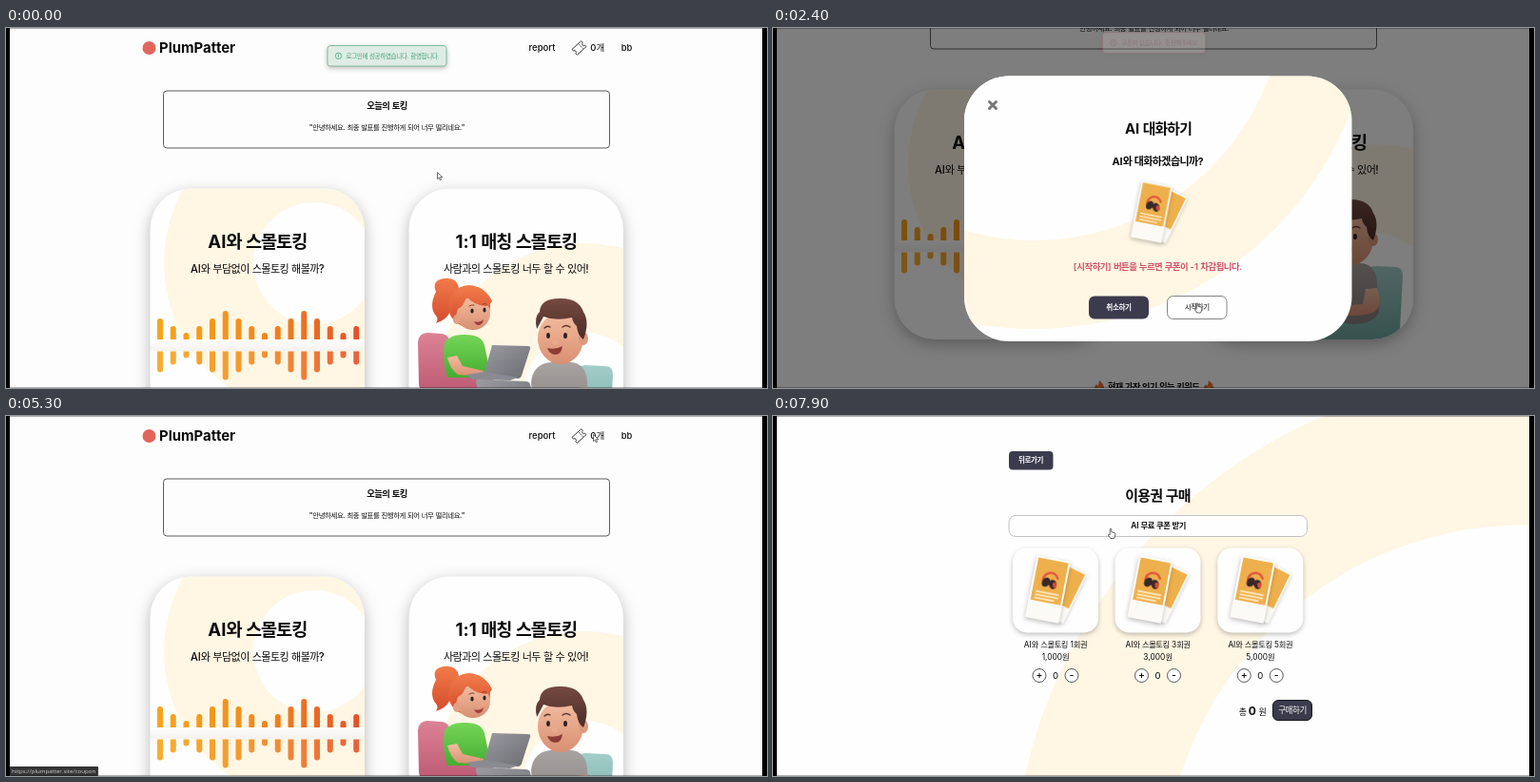
Recreate the animation shown at these times as an HTML page. Size 800 by 378 pixels, loop 8000 ms.

```html
<!DOCTYPE html>
<html lang="ko">
<head>
<meta charset="utf-8">
<style>
html, body { margin: 0; width: 100%; height: 100%; overflow: hidden; background: #000; }
svg { display: block; width: 800px; height: 378px; }
text { font-family: Inter, "Noto Sans CJK KR", sans-serif; white-space: pre; }
.ko { letter-spacing: -.055em; }
.url { font-family: "Open Sans", sans-serif; }
.card { filter: drop-shadow(0 5px 8px rgba(0,0,0,.28)); }
.soft { filter: drop-shadow(0 2px 2.5px rgba(0,0,0,.25)); }
</style>
</head>
<body>
<svg id="stage" viewBox="0 0 800 378"></svg>
<script>
const LOOP = 8000, INK = '#0b0b0b', CREAM = '#fff6e3', NAVY = '#3c3b4d';

// Text is placed by the centre of its line; only Hangul runs are tightened.
const text = (x, y, size, str, weight = 400, fill = INK, anchor = 'middle', cls = '') =>
  `<text x="${x}" y="${y + size * .36}" font-size="${size}" font-weight="${weight}" fill="${fill}" text-anchor="${anchor}" class="${cls}">${str.replace(/[가-힣]+/g, '<tspan class="ko">$&</tspan>')}</text>`;
const rect = (x, y, w, h, r, fill, more = '') =>
  `<rect x="${x}" y="${y}" width="${w}" height="${h}" rx="${r}" fill="${fill}" ${more}/>`;
const circle = (x, y, r, fill, more = '') => `<circle cx="${x}" cy="${y}" r="${r}" fill="${fill}" ${more}/>`;
const oval = (x, y, rx, ry, fill, turn = 0) =>
  `<ellipse cx="${x}" cy="${y}" rx="${rx}" ry="${ry}" fill="${fill}" transform="rotate(${turn} ${x} ${y})"/>`;
const path = (d, fill, more = '') => `<path d="${d}" fill="${fill}" ${more}/>`;
const line = (d, color, w) => path(d, 'none', `stroke="${color}" stroke-width="${w}" stroke-linecap="round" stroke-linejoin="round"`);
const ring = (x, y, outer, inner) => circle(x, y, outer, CREAM) + circle(x, y, inner, '#fefefe');
const group = (id, body, more = '') => `<g id="${id}" ${more}>${body}</g>`;
const shade = (id, a, b, dir = 'x2="0" y2="1"') =>
  `<linearGradient id="${id}" x1="0" y1="0" ${dir}><stop stop-color="${a}"/><stop offset="1" stop-color="${b}"/></linearGradient>`;
const clip = (id, ...box) => `<clipPath id="${id}">${rect(...box, '#000')}</clipPath>`;

const defs = `<defs>
  ${clip('clipA', 151.5, 64.5, 225.5, 262.5, 43)}${clip('clipB', 423.5, 64.5, 225.5, 262.5, 43)}
  ${clip('clipM', 201, 50.5, 407.5, 278.5, 47)}
  <linearGradient id="wave" gradientUnits="userSpaceOnUse" x1="159" x2="372" y1="0" y2="0"><stop stop-color="#f7a51b"/><stop offset=".5" stop-color="#f18a1d"/><stop offset="1" stop-color="#e5502b"/></linearGradient>
  ${shade('band', '#fff', '#f3f1f0')}
  ${shade('pink', '#dc8296', '#bd5b74')}${shade('teal', '#a3cdc8', '#6fa5a1')}
  ${shade('green', '#74d657', '#45ad32')}${shade('tee', '#a8a3a1', '#837e7d')}
  ${shade('skin', '#f3bda0', '#d98f72')}${shade('red', '#f27b4a', '#d34c2c')}
  ${shade('brown', '#754a40', '#4b2b28')}${shade('metal', '#9b9ba1', '#6b6b72', 'x2="1" y2="1"')}
</defs>`;

function bars() {
  const heights = [22, 14, 7, 14, 22, 30];
  let out = rect(152, 222.5, 225, 12.5, 0, 'url(#band)', 'opacity=".9"');
  for (let i = 0; i < 16; i++) {
    const h = heights[i % 6], x = 159 + i * 13.75;
    out += path(`M${x} 223v${3 - h}a3 3 0 0 1 6 0v${h - 3}z`, 'url(#wave)')
      + path(`M${x} 235.5v${h - 3}a3 3 0 0 0 6 0v${3 - h}z`, 'url(#wave)', 'opacity=".9"');
  }
  return out;
}

function girl() {
  return path('M433 226q1-10 10-10l15 1q8 1 9 10l3 34 38 2q5 1 5 7t-6 6l-66 1q-7 0-7-8z', 'url(#pink)')
    + path('M452 173q-5-12 8-14 14-2 16 10-4 9-8 14 2 17-16 23 3-5 0-8-8-9 0-25z', 'url(#red)')
    + path('M461 226q7-9 22-8 17 0 20 11l5 24q-8 10-22 10h-22q-6-18-3-37z', 'url(#green)')
    + path('M464 242l10-2 6 11 22 5-2 6-25-2q-8-6-11-18z', 'url(#skin)')
    + circle(487, 188, 22, 'url(#red)') + oval(491, 196, 18, 17, 'url(#skin)')
    + path('M471 205q-8-24 8-35 22-8 32 13-3 5-7 5-12-1-20-10-3 11-9 13z', 'url(#red)')
    + oval(474, 202, 4, 5, '#e3a083')
    + oval(490, 193, 1.7, 2.6, '#352522') + oval(503, 192, 1.6, 2.5, '#352522')
    + line('M487 188q3-2 5-1M501 186q3-1 4 0', '#8e3f2a', 1)
    + path('M492 204q6 2 10-2-1 6-6 6-3-1-4-4z', '#9c4038') + oval(500, 198, 2.4, 2, '#eaa383')
    + path('M511 229l38 1q3 0 2 3l-9 28q-1 3-4 3l-36-3z', 'url(#metal)')
    + path('M484 260l20-3 34 6-8 3-40-1z', '#8a8b92');
}

function boy() {
  return path('M594 264q3-13 15-14l21 1q8 0 8 9l-3 57q0 10-12 10h-120q-11-2-11-10t13-8l75-2z', 'url(#teal)')
    + path('M552 268q2-19 20-21h22q15 1 17 19l2 33q-6 12-29 12l-29-7z', 'url(#tee)')
    + path('M599 274l12-1q6 19-3 25-10 6-44 3l-7-4 2-5 37-2z', 'url(#skin)')
    + oval(583, 222, 24, 27, 'url(#skin)') + oval(607, 222, 5, 7, '#dd987c')
    + path('M558 212q-3-13 3-18 1-15 23-14 18 0 23 14 7 11 0 29-6-4-7-14-4-3-5-9-17 4-30-1-3 6-7 13z', 'url(#brown)')
    + oval(570, 219, 1.9, 3, '#302220') + oval(588, 219, 2, 3.1, '#302220')
    + line('M566 211q3-3 6-1M585 210q4-3 8 0', '#553229', 1.4)
    + path('M569 232q9 2 16-2-1 9-8 9-6-1-8-7z', '#8d3c36') + oval(577, 226, 3, 2.5, '#ebaa8c')
    + path('M496 265l50 2q4 0 5 3l9 34q0 4-4 4l-50 1q-3 0-4-3l-8-38q0-3 2-3z', 'url(#metal)')
    + path('M504 309l54-4 16-2 2 2-22 5-45 2z', '#8e8f95');
}

function tickets(x, y, scale = 1) {
  const paper = print => `<g class="soft">${rect(-18, -33, 36, 66, 1.5, '#fcfaf5')}${rect(-16, -31, 32, 45, .5, '#eeb04c')}${print}</g>`;
  const print = line('M-7-9A8 9 0 0 1 8-13', '#e0533c', 2.4)
    + oval(-3.5, -7, 4, 5.2, '#38282a', 25) + oval(4, -6, 4, 5, '#38282a', -25) + oval(6, -5.5, 2, 3, '#d94b39', -20)
    + line('M-12 4h24M-12 7.5h24M-12 11h20', '#fff2d4', 1.3);
  return `<g transform="translate(${x} ${y}) scale(${scale})">
    <g transform="translate(14.5 3) rotate(26) scale(.88)">${paper('')}</g>
    <g transform="rotate(11)">${paper(print)}</g></g>`;
}

const flame = x => path(`M${x} 370q5 4 5 8 0 4-5 4t-5-4q0-2 2-4l1 2q2-2 2-6z`, '#ee6a2a') + oval(x, 379, 2, 2.5, '#fcc04a');

// Page coordinates are those of the page scrolled by 104px.
function home() {
  const header = circle(150.5, -83, 7, '#e2655c')
    + text(161, -83, 14.9, 'PlumPatter', 700, INK, 'start')
    + text(563.5, -83, 9.5, 'report', 500)
    + `<g transform="translate(602.5 -83) rotate(-42)">${path('M-6.5-4h13v2.4a1.7 1.7 0 0 0 0 3.4v2.2h-13v-2.2a1.7 1.7 0 0 0 0-3.4z', 'none', 'stroke="#333" stroke-width=".9"')}${line('M2.5-3v1.2M2.5-.5v1M2.5 2v1', '#333', .7)}</g>`
    + text(621.5, -83, 9.5, '0개', 500) + text(652.5, -83, 9.3, 'bb', 500);
  const topic = rect(165.5, -38, 469, 60, 3.5, '#fdfdfd', 'stroke="#4a4a4a" stroke-width=".9"')
    + text(400.5, -22, 9.35, '오늘의 토킹', 700)
    + text(400.5, .5, 7.4, '"안녕하세요. 최종 발표를 진행하게 되어 너무 떨리네요."', 500);
  const card = (id, x, inside, title, note) => group(id,
    rect(x, 64.5, 225.5, 262.5, 43, '#fefefe', 'class="card"')
    + `<g clip-path="url(#clip${id})">${inside}</g>`
    + text(x + 112.8, 120, 18.6, title, 700) + text(x + 112.8, 149.5, 11.1, note, 500));
  return header + topic
    + card('A', 151.5, ring(324, 143, 158, 64) + bars(), 'AI와 스몰토킹', 'AI와 부담없이 스몰토킹 해볼까?')
    + card('B', 423.5, ring(608, 280, 158, 64) + girl() + boy(), '1:1 매칭 스몰토킹', '사람과의 스몰토킹 너두 할 수 있어!')
    + flame(343) + flame(458) + text(400, 376.5, 9.2, '현재 가장 인기 있는 키워드', 700);
}

function modal() {
  return rect(0, 0, 800, 378, 0, '#000', 'opacity=".5"')
    + rect(201, 50.5, 407.5, 278.5, 47, '#fefefe')
    + `<g clip-path="url(#clipM)">${ring(275, -40, 356, 263)}</g>`
    + line('M227.5 77.5l7 7m0-7l-7 7', '#777', 3)
    + text(405, 105.5, 14.8, 'AI 대화하기', 700) + text(404.5, 140, 11, 'AI와 대화하겠습니까?', 700)
    + tickets(398, 193, .92)
    + text(404.5, 251, 9.45, '[시작하기] 버튼을 누르면 쿠폰이 -1 차감됩니다.', 600, '#d0526b')
    + rect(332, 281.5, 63, 24, 6, NAVY) + text(363.5, 293.5, 7.6, '취소하기', 600, '#fff')
    + rect(414.5, 281.5, 62.5, 24, 6, '#fff', 'stroke="#777" stroke-width=".9"') + text(445.7, 293.5, 7.5, '시작하기', 500);
}

function shop() {
  const item = (x, n) => rect(x - 45, 138.5, 90, 89, 15, '#fefefe', 'class="soft"') + tickets(x - 8, 182)
    + text(x, 240.5, 8.3, `AI와 스몰토킹 ${n}회권`) + text(x, 252.5, 8.4, `${n},000원`)
    + [-17, 17].map(d => circle(x + d, 272.5, 7, '#fefefe', 'stroke="#444" stroke-width=".9"')
      + text(x + d, 272, 10.5, d < 0 ? '+' : '-', 500)).join('')
    + text(x, 272.5, 9.6, '0');
  return rect(0, 0, 800, 378, 0, '#fefefe') + ring(790, 495, 538, 380.5)
    + rect(248, 37, 46.5, 19.5, 4, NAVY) + text(271, 46.7, 7.5, '뒤로가기', 600, '#fff')
    + text(404.5, 83.5, 15, '이용권 구매', 700)
    + rect(248, 104.5, 313.5, 22, 7, '#fefefe', 'stroke="#bbb" stroke-width=".9"')
    + text(405, 115.5, 8.3, 'AI 무료 쿠폰 받기', 600)
    + item(297, 1) + item(404.5, 3) + item(512.3, 5)
    + text(493.7, 310.5, 9, '총') + text(503.8, 309.5, 12, '0', 700) + text(514.3, 310.5, 9, '원')
    + rect(525.5, 298.5, 41, 21, 5.5, NAVY, 'stroke="#15151c" stroke-width="1"') + text(546, 309, 8.6, '구매하기', 400, '#fff');
}

const toast = (id, x, w, fill, edge, ink, size, str) => group(id,
  rect(x, 18.5, w, 21.5, 3, fill, `stroke="${edge}" stroke-width=".9" class="soft"`)
  + circle(x + 11.5, 29.3, 3.2, 'none', `stroke="${ink}" stroke-width=".8"`) + line(`M${x + 11.5} 27.8v1.8m0 1.2v.1`, ink, .8)
  + text(x + 19.5, 29.3, size, str, 500, ink, 'start'));

document.getElementById('stage').innerHTML = defs
  + rect(0, 0, 800, 378, 0, '#fdfdfd') + group('home', home()) + group('modal', modal())
  + toast('hello', 338, 125, '#dfece6', '#78b898', '#45a175', 6.55, '로그인에 성공하였습니다. 환영합니다.')
  + toast('empty', 346.5, 108, '#fbe4e6', '#df5264', '#cf4756', 6.65, '쿠폰이 없습니다. 충전해주세요.')
  + group('shop', shop())
  + group('status', rect(4, 368, 85, 10, 1, '#353535') + text(6, 373.2, 6.1, '', 400, '#d2d2d2', 'start', 'url'))
  + group('arrow', path('M0 0v7.2l1.7-1.6 1.2 2.7 1.2-.5-1.2-2.7h2.4z', '#fff', 'stroke="#333" stroke-width=".7"'))
  + group('hand', path('M-.8 4.5V.6a.8.8 0 0 1 1.6 0v2.7l3 .7q1.2.3 1 1.6l-.5 2.7-.8 1.7h-3.6l-2.6-3.4q.2-1.6 1.9-.2z', '#fff', 'stroke="#333" stroke-width=".75"'))
  + rect(0, 0, 4, 378, 0, '#000') + rect(795, 0, 5, 378, 0, '#000')
  + rect(0, 0, 800, .3, 0, '#000') + rect(0, 377.7, 800, .3, 0, '#000');

const el = id => document.getElementById(id);
const show = (id, on) => el(id).setAttribute('opacity', +on);
const move = (id, x, y) => el(id).setAttribute('transform', `translate(${x} ${y})`);
const ramp = (t, a, b) => Math.max(0, Math.min(1, (t - a) / (b - a)));
const ease = (t, a, b) => { const p = ramp(t, a, b); return p * p * (3 - 2 * p); };
const during = (t, a, b) => t >= a && t < b;

// Pointer stops: time, x, y.
const stops = [
  [0, 453.5, 151.5], [100, 453.5, 151.5], [400, 430, 175], [750, 290, 205], [950, 290, 205], [1400, 355.5, 221],
  [1850, 446, 289], [2600, 446, 289], [2900, 420, 250], [3450, 234, 84], [3650, 234, 84], [4100, 564, 36],
  [4500, 580, 45], [5000, 612, 24], [5300, 617.5, 19.5], [5500, 617.5, 19.5], [5980, 446.5, 116.5],
  [6100, 446.5, 116.5], [6300, 545, 306], [6500, 400, 4], [6700, 275, 112], [6850, 275, 112],
  [7100, 400, 4], [7400, 290, 190], [7700, 550, 302], [7800, 420, 200], [7900, 355, 118.5], [8000, 355, 118.5]
];

function pointer(t) {
  const i = Math.max(1, stops.findIndex(s => s[0] > t));
  const [t0, x0, y0] = stops[i - 1], [t1, x1, y1] = stops[i];
  const p = ease(t, t0, t1);
  return [x0 + (x1 - x0) * p, y0 + (y1 - y0) * p];
}

function draw(t) {
  const inShop = t >= 5500, open = during(t, 800, 3700);
  const scroll = 104 * (ease(t, 100, 500) - ease(t, 4200, 4600));
  const spread = 24 * (ease(t, 1850, 2100) - ramp(t, 3690, 3700));
  move('home', 0, 104 - scroll);
  move('A', -spread, 0);
  move('B', spread, 0);
  show('modal', open ? ramp(t, 800, 900) : 0);
  show('shop', inShop);
  show('hello', t < 1900 ? 1 - .6 * ramp(t, 1000, 1400) - .4 * ramp(t, 1400, 1850) : 0);
  show('empty', ramp(t, 2380, 2500) * (1 - ramp(t, 3720, 4000)));
  move('empty', 0, -15 * (1 - ease(t, 2380, 2500)));

  const coupon = during(t, 5150, 5500);
  show('status', during(t, 600, 1700) || during(t, 3800, 4400) || coupon);
  const bar = el('status');
  bar.querySelector('rect').setAttribute('width', coupon ? 93 : 85);
  bar.querySelector('text').textContent = 'https://plumpatter.site/' + (coupon ? 'coupon' : 'main');

  const [x, y] = pointer(t);
  const hand = inShop
    ? (x > 248 && x < 561 && y > 104 && y < 127) || (x > 525 && y > 298)
    : during(t, 650, 1000) || during(t, 1800, 2750) || during(t, 3400, 3700);
  show('hand', hand);
  show('arrow', !hand);
  move('hand', x, y);
  move('arrow', x, y);
}

function tick() {
  draw(performance.now() % LOOP);
  requestAnimationFrame(tick);
}
tick();
</script>
</body>
</html>
```
